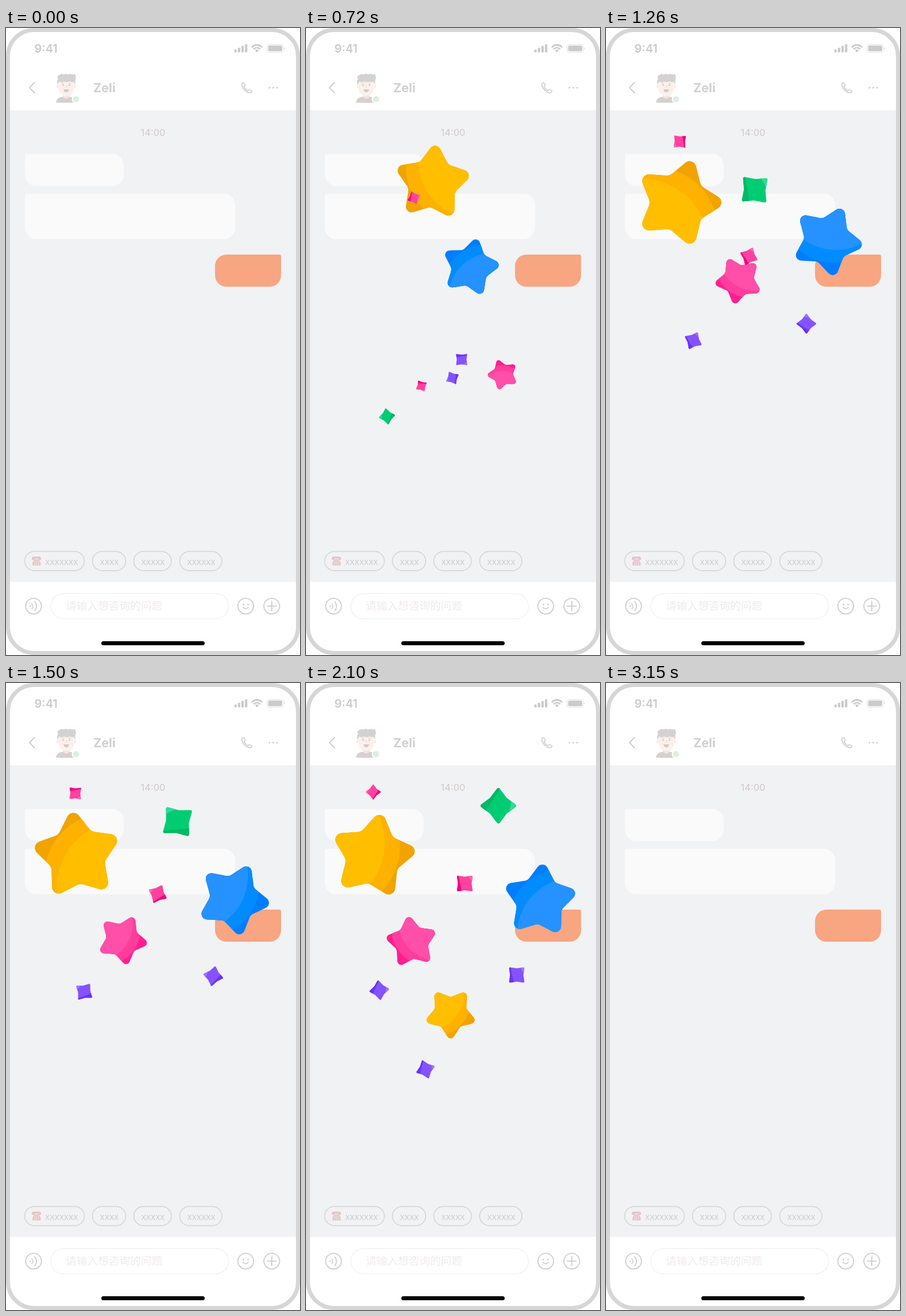
Recreate the animation shown at these times as an HTML page with a canvas. Size 512 px wide and 1093 px high, loop 3.54 s.

```html
<!DOCTYPE html>
<html lang="zh">
<head>
<meta charset="utf-8">
<title>Chat confetti</title>
<style>
html, body { margin: 0; width: 100%; height: 100%; overflow: hidden; background: #fff; }
canvas { display: block; width: 100vw; height: 100vh; }
</style>
</head>
<body>
<canvas id="stage"></canvas>
<script>
const W = 512, H = 1093, LOOP = 3540, STEP = 30, TAU = Math.PI * 2;
const canvas = document.getElementById('stage');
const c = canvas.getContext('2d');
const LINE = '#d0d0d0';
const SANS = 'Inter, "Noto Sans", sans-serif';
const CJK = '"Noto Sans CJK SC", "Noto Sans CJK", sans-serif';

// ---------- drawing helpers ----------
function box(x, y, w, h, r, fill) {
  c.beginPath();
  c.roundRect(x, y, w, h, r);
  c.fillStyle = fill;
  c.fill();
}
function boxLine(x, y, w, h, r, color, lw) {
  c.beginPath();
  c.roundRect(x, y, w, h, r);
  c.strokeStyle = color;
  c.lineWidth = lw;
  c.stroke();
}
function disc(x, y, r, fill) {
  c.beginPath();
  c.arc(x, y, r, 0, TAU);
  c.fillStyle = fill;
  c.fill();
}
function arc(x, y, r, a, b, lw, color = LINE) {
  c.beginPath();
  c.arc(x, y, r, a, b);
  c.strokeStyle = color;
  c.lineWidth = lw;
  c.stroke();
}
function path(d, lw, color = LINE) {
  c.strokeStyle = color;
  c.lineWidth = lw;
  c.stroke(new Path2D(d));
}
function shape(d, fill) {
  c.fillStyle = fill;
  c.fill(new Path2D(d));
}
function text(s, x, y, font, fill, align = 'left') {
  c.font = font;
  c.fillStyle = fill;
  c.textAlign = align;
  c.fillText(s, x, y);
}

// ---------- phone screen ----------
function statusBar() {
  text('9:41', 49.5, 42.5, '600 20px ' + SANS, '#cbcbcb');
  for (let i = 0; i < 4; i++) {
    const h = 5 + i * 3.1;
    box(397.5 + i * 6.2, 42.5 - h, 4.2, h, 1, '#cbcbcb');
  }
  const up = -Math.PI / 2;
  arc(437, 41, 11.5, up - .8, up + .8, 2.8, '#cbcbcb');
  arc(437, 41, 6.8, up - .8, up + .8, 2.6, '#cbcbcb');
  shape('M437 42.5L433.8 38.7Q437 36.3 440.2 38.7Z', '#cbcbcb');
  boxLine(454.5, 28.5, 28.5, 14, 4, '#e3e3e3', 1.1);
  box(456.5, 30.5, 24.5, 10, 2.3, '#cbcbcb');
  shape('M484.5 33Q487 35.5 484.5 38Z', '#dddddd');
}

function avatar() {
  shape('M87 130Q88 121 98 120H112Q122 121 123 130Q105 131 87 130Z', '#d5d1d1');
  shape('M99 114H111V120Q105 126 99 120Z', '#fbe3dd');
  disc(90.5, 102, 2.8, '#fdeae5');
  disc(119.5, 102, 2.8, '#fdeae5');
  shape('M91 92H119V104Q118 118 105 118Q92 118 91 104Z', '#fdf0ec');
  shape('M89.5 99Q88 91 91 89Q87 84 93 82Q96 79 100 81Q104 79 108 81Q112 79 115 81Q122 79 121 84Q123 88 120.500 90V99L118 94Q114 95 111 93Q105 96 101 93Q97 96 93 93Z', '#d5d1d1');
  disc(99.5, 99.5, 1.6, '#cfcaca');
  disc(110.5, 99.5, 1.6, '#cfcaca');
  path('M97 96.500Q99 95 101 96M109 96Q111 95 113 96.500', 1, '#d5d1d1');
  path('M105 100V103.500', 1.2, '#f5d6cf');
  shape('M100 107H110Q109 112 105 112Q101 112 100 107Z', '#d0cbcb');
  disc(122, 124, 7.5, '#fff');
  disc(122, 124, 5.3, '#d9f2da');
}

function header() {
  path('M49.500 95L41 104L49.500 113', 2.1);
  avatar();
  text('Zeli', 152, 111.5, '700 21.5px ' + SANS, '#d0d0d0');
  path('M413.200 95.300Q410 96.500 410.500 99.500Q412 105 416.500 109Q420.500 112.600 424.800 113Q427.500 113 428.300 109.800Q428 108.700 423.500 107.300L421.200 109.200Q416.800 107 414.600 102.700L416.600 100.600Q415.500 95.500 413.200 95.300Z', 1.7);
  for (let i = 0; i < 3; i++) disc(458.7 + i * 6.8, 104, 1.6, LINE);
}

function pill(x, w, label, tx) {
  boxLine(x, 912.5, w, 33.5, 16.75, '#d3d3d3', 1.4);
  text(label, tx, 936, '300 16.5px ' + CJK, '#d0d0d0');
}

function footer() {
  pill(32.5, 104, 'xxxxxxx', 68);
  pill(150.5, 58, 'xxxx', 163.5);
  pill(222.5, 65.5, 'xxxxx', 235.5);
  pill(302.5, 73.5, 'xxxxxx', 315.5);
  shape('M45 927Q44 921.500 49 921.500H57Q62 921.500 61 927H57V925H49V927Z', '#e3c4c8');
  shape('M49 926H57L60.500 932V935.500Q60.500 937 59 937H47.500Q46 937 46 935.500V932Z', '#e8c8cb');
  for (let i = 0; i < 9; i++)
    disc(50 + i % 3 * 3.2, 929.5 + Math.floor(i / 3) * 2.7, .8, '#f5e6e7');

  boxLine(78, 986, 309.5, 44, 22, '#f2f2f2', 1.5);
  text('请输入想咨询的问题', 104, 1014, '300 18.7px ' + CJK, '#f1eaea');
  for (const x of [48, 417.5, 462.8]) arc(x, 1007.8, 13.7, 0, TAU, 1.9);
  disc(42, 1008, 1.5, LINE);
  arc(41, 1008, 5.8, -.8, .8, 1.7);
  arc(41, 1008, 12, -.72, .72, 1.7);
  disc(413.5, 1005, 1.6, LINE);
  disc(421.5, 1005, 1.6, LINE);
  arc(417.5, 1007, 5.3, .5, Math.PI - .5, 1.7);
  path('M455 1007.800H470.600M462.800 1000V1015.600', 2);
  box(166, 1069, 180, 7, 3.5, '#000');
}

function screen() {
  c.fillStyle = '#fff';
  c.fillRect(0, 0, W, H);
  c.lineCap = c.lineJoin = 'round';
  box(6, 143.5, 500, 822, 0, '#f1f2f4');
  boxLine(3.5, 3.5, W - 7, H - 7, 45, '#d6d6d6', 7);
  statusBar();
  header();
  text('14:00', 256, 187.5, '400 16.5px ' + SANS, '#d3c9c9', 'center');
  box(33, 219.5, 172, 56, [3, 20, 20, 20], '#fafafa');
  box(33, 289, 366, 79, [3, 20, 20, 20], '#fafafa');
  box(364, 395, 115, 56, [20, 3, 20, 20], '#f8a582');
  footer();
}

// ---------- confetti shapes (unit size, base colour / mid or light / dark) ----------
const GOLD = ['#ffbe00', '#ffb100', '#f1a300'];
const BLUE = ['#2592ff', '#008cff', '#007dff'];
const ROSE = ['#ff4fa8', '#ff3d9c', '#ff1f90'];
const VIOLET = ['#8552ff', '#9c76ff', '#6933fb'];
const PINK = ['#ff419f', '#ff66b2', '#f5007f'];
const GREEN = ['#00cd72', '#36d898', '#00b965'];

function spiky(points, outer, inner, rTip, rNotch) {
  const at = i => {
    const a = i * Math.PI / points, r = i % 2 ? inner : outer;
    return [r * Math.cos(a), r * Math.sin(a)];
  };
  const [ax, ay] = at(0), [bx, by] = at(1);
  c.beginPath();
  c.moveTo((ax + bx) / 2, (ay + by) / 2);
  for (let i = 1; i <= points * 2; i++)
    c.arcTo(...at(i), ...at(i + 1), i % 2 ? rNotch : rTip);
  c.closePath();
}

function star([base, mid, dark]) {
  spiky(5, 1.155, .66, .16, .2);
  c.fillStyle = dark;
  c.fill();
  c.clip();
  c.rotate(22 * Math.PI / 180);
  disc(.62 - 1.5, 0, 1.5, mid);
  disc(.24 - 1.6, 0, 1.6, base);
}

function chip([base, light, dark]) {
  spiky(4, 1.06, .645, .09, .3);
  c.fillStyle = base;
  c.fill();
  c.clip();
  c.rotate(Math.PI / 4);
  shape('M.2 -1L1 -1L1 1L.65 1Q.5 .1 .2 -1Z', dark);
  shape('M-1 -.2L-.8 -.15Q-.6 .4 -.25 .8L-.25 1L-1 1Z', light);
}

// ---------- confetti motion ----------
const LEFT = 140, RIGHT = 430, FLOOR = 882, SPIN = .37;
const pieces = [];

// keys: [time, x, y, radius, degrees]; each piece flies in from a bottom corner and shrinks away
function piece(draw, colors, side, born, gone, ...keys) {
  const first = keys[0], last = keys[keys.length - 1];
  keys.unshift([born, side, FLOOR, 0, first[4] + SPIN * (first[0] - born)]);
  keys.push([gone, last[1], last[2], 0, last[4] - SPIN * (gone - last[0])]);
  pieces.push({ draw, colors, born, gone, keys });
}

piece(star, GOLD, RIGHT, 0, 2560,
  [720, 220, 270, 64, 131], [1260, 126, 304, 74, -72], [1770, 122, 297, 74, -270],
  [2100, 117, 302, 72, -368], [2190, 117, 302, 70, -400]);
piece(star, BLUE, LEFT, 60, 2730,
  [720, 286, 417, 49, 211], [1260, 385, 371, 60, 79], [1770, 403, 384, 62, -75],
  [2100, 407, 379, 62, -157], [2220, 405, 378, 59, -190], [2580, 402, 378, 9, -330]);
piece(star, ROSE, RIGHT, 400, 2960,
  [720, 343, 604, 26, 250], [1260, 231, 440, 40, 100], [1770, 186, 457, 43.5, -106],
  [2100, 184, 452, 43.5, -241], [2580, 181, 459, 41, -399]);
piece(star, GOLD, LEFT, 1660, 2715,
  [2100, 252, 576, 43, 18], [2580, 277, 570, 37, -107]);
piece(chip, VIOLET, LEFT, 300, 2880,
  [720, 271, 578, 13, 225], [1260, 349, 515.5, 17, 90], [1770, 367, 509, 17.5, -90],
  [2100, 367, 509, 18, -225], [2580, 367, 509, 13, -430]);
piece(chip, VIOLET, RIGHT, 340, 2940,
  [720, 255, 610, 12, 331], [1260, 152, 545, 16, 117], [1770, 128, 535, 17, -54],
  [2100, 127.5, 535.5, 17, -187], [2580, 127.5, 535.5, 15, -394]);
piece(chip, PINK, RIGHT, 60, 2610,
  [720, 188, 296, 11.5, 158], [1260, 128.5, 198, 13.8, -42], [1770, 117, 190, 13, -237],
  [2100, 117, 190, 13, -360], [2220, 117, 190, 12, -404], [2580, 117, 190, 1.2, -540]);
piece(chip, PINK, LEFT, 380, 3150,
  [720, 201, 624, 10.5, 240], [1260, 249, 398, 16, 113], [1770, 274.5, 352, 17.5, -88],
  [2100, 276.5, 349.5, 18.5, -225], [2580, 277, 349.5, 17.5, -360]);
piece(chip, GREEN, LEFT, 430, 3150,
  [720, 141, 677, 14, 351], [1260, 259, 282, 29, 138], [1770, 327, 220, 32, -45],
  [2100, 335, 214, 31, -180], [2580, 335, 214, 31, -350]);
piece(chip, VIOLET, RIGHT, 1680, 2715,
  [2100, 208, 673.5, 16.5, 161], [2580, 197, 660.5, 14.5, -132]);

// slope of channel k at key i: eased, without overshoot
function slope(keys, i, k) {
  const rate = j => (keys[j + 1][k] - keys[j][k]) / (keys[j + 1][0] - keys[j][0]);
  if (i === 0) return rate(0) * (k === 4 ? 1 : 1.7);
  if (i === keys.length - 1) return rate(i - 1);
  const a = rate(i - 1), b = rate(i);
  return a * b <= 0 ? 0 : 2 * a * b / (a + b);
}

function sample(keys, t) {
  let i = 0;
  while (i < keys.length - 2 && t >= keys[i + 1][0]) i++;
  const p = keys[i], q = keys[i + 1], d = q[0] - p[0], u = (t - p[0]) / d;
  const s = u * u * (3 - 2 * u), v = 1 - u;
  return [1, 2, 3, 4].map(k =>
    p[k] + (q[k] - p[k]) * s +
    d * (slope(keys, i, k) * u * v * v - slope(keys, i + 1, k) * u * u * v));
}

function confetti(t) {
  for (const p of pieces) {
    if (t <= p.born || t >= p.gone) continue;
    const [x, y, r, deg] = sample(p.keys, t);
    if (r < .2) continue;
    c.save();
    c.translate(x, y);
    c.rotate(deg * Math.PI / 180);
    c.scale(r, r);
    p.draw(p.colors);
    c.restore();
  }
}

// ---------- loop ----------
function resize() {
  const ratio = window.devicePixelRatio || 1;
  canvas.width = Math.round(innerWidth * ratio);
  canvas.height = Math.round(innerHeight * ratio);
}
addEventListener('resize', resize);
resize();

const start = performance.now();
function frame() {
  const t = Math.floor((performance.now() - start) % LOOP / STEP) * STEP;
  c.setTransform(canvas.width / W, 0, 0, canvas.height / H, 0, 0);
  screen();
  confetti(t);
  requestAnimationFrame(frame);
}
frame();
</script>
</body>
</html>
```
